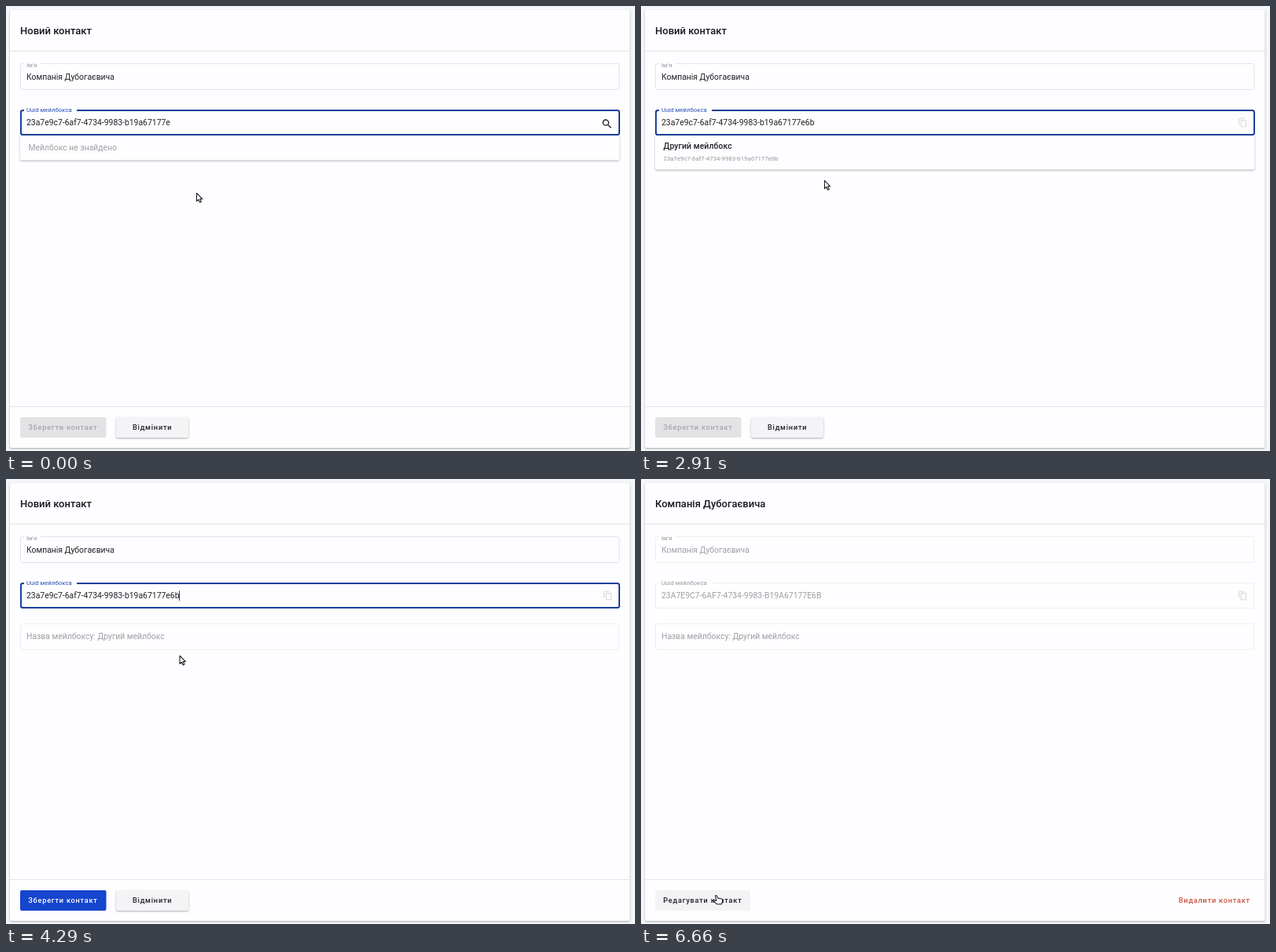
Write an HTML page that moves like this. It is 800x567 px and loops after 6810 ms.

```html
<!DOCTYPE html>
<html lang="uk">
<head>
<meta charset="utf-8">
<title>Новий контакт</title>
<style>
  html, body { margin: 0; width: 100%; height: 100%; overflow: hidden; background: #f4f6f9; }
  svg { display: block; width: 100%; height: 100%; }
  text { font: 400 10.4px Roboto, sans-serif; fill: #222126; }
  .title { font-size: 13px; font-weight: 500; fill: #18171c; }
  .label { font-size: 7.8px; fill: #98979c; }
  .button { font-size: 9.1px; font-weight: 500; letter-spacing: .0893em; }
  .muted { fill: #a09fa4; }
  .field { fill: none; stroke: #e3e2e6; }
  .pale { stroke: #efeef1; }
  .lift { filter: drop-shadow(0 1px 1.2px rgba(0, 0, 0, .32)); }
  .cursor { fill: #fff; stroke: #1b1b1f; stroke-width: 1.1; stroke-linejoin: round; }
</style>
</head>
<body>
<svg viewBox="0 0 800 567">
  <rect width="800" height="567" fill="#f4f6f9"/>
  <rect class="lift" x="5" y="5" width="788.5" height="558" rx="2.5" fill="#fefdff"/>
  <path d="M5 57.5H793.5M5 510.5H793.5" stroke="#e3e3e9"/>
  <text id="title" class="title" x="18" y="35.7"></text>

  <rect id="nameBox" class="field" x="18.5" y="73.5" width="761.5" height="33" rx="2.5"/>
  <rect x="23" y="71" width="21" height="5" fill="#fefdff"/>
  <text class="label" x="26" y="77.6">Ім'я</text>
  <text id="name" x="26" y="94"></text>

  <rect id="uuidBox" class="field" x="18.5" y="132.5" width="761.5" height="32" rx="2.5"/>
  <rect id="uuidFocus" x="19" y="133" width="761" height="31" rx="2.5" fill="none" stroke="#1c409c" stroke-width="2"/>
  <rect x="23" y="130" width="67" height="5" fill="#fefdff"/>
  <text id="uuidLabel" class="label" x="26" y="135.4">Uuid мейлбокса</text>
  <text id="uuid" x="26" y="152"></text>
  <rect id="caret" y="142.5" width="1" height="12.5" fill="#35343c"/>
  <path id="searchIcon" transform="translate(756.7 142.4) scale(.65)" fill="#1d1c21"
    d="M15.5 14h-.8l-.3-.3A6.5 6.5 0 1 0 13.7 14.4l.3.3v.8l5 5 1.5-1.5zM9.5 14a4.5 4.5 0 1 1 0-9 4.5 4.5 0 0 1 0 9z"/>
  <path id="copyIcon" transform="translate(759 142.3) scale(.52)" fill="none" stroke="#d6d5d9" stroke-width="2"
    d="M16 2H5Q3 2 3 4V17M9 6H19Q20 6 20 7V21Q20 22 19 22H9Q8 22 8 21V7Q8 6 9 6z"/>

  <g id="mailbox">
    <rect class="field pale" x="18.5" y="184.5" width="761.5" height="33" rx="2.5"/>
    <text class="muted" x="26" y="204">Назва мейлбоксу: Другий мейлбокс</text>
  </g>

  <g id="dropdown">
    <path id="panel" class="lift"/>
    <text id="empty" class="muted" x="28.5" y="184">Мейлбокс не знайдено</text>
    <g id="option">
      <text x="28.5" y="182" style="font-weight:500;letter-spacing:.1px">Другий мейлбокс</text>
      <text id="optionUuid" class="label" x="28.5" y="197.4"></text>
    </g>
  </g>

  <g id="editing">
    <rect id="save" x="18" y="524" width="109.5" height="26" rx="2"/>
    <circle id="ripple" cx="96" cy="533" fill="#fff" clip-path="inset(0)"/>
    <text id="saveText" class="button" x="28.3" y="540.3">Зберегти контакт</text>
    <rect class="lift" x="140" y="524" width="92" height="26" rx="2" fill="#f4f3f5"/>
    <text class="button" x="161" y="540.3">Відмінити</text>
  </g>
  <g id="viewing">
    <rect x="18" y="524" width="121" height="26" rx="2" fill="#f3f2f5"/>
    <text class="button" x="28.3" y="540.3">Редагувати контакт</text>
    <text class="button" x="683.8" y="540.3" style="fill:#c9523f">Видалити контакт</text>
  </g>

  <path id="arrow" class="cursor" d="M.5.5V10.8L2.9 8.6 4.5 12.3 6.3 11.5 4.7 7.9H7.8z"/>
  <path id="hand" class="cursor" d="M-1.4 1.5Q-1-.1.3.9L1.8 4.1 6 4.8Q7.6 5.2 7.5 7V9.2L6.4 11.7H.4L-3.4 8.2Q-3.8 6.8-2.3 6.9L-.2 7.6z"/>
</svg>
<script>
const LOOP = 6810, BLINK = 360;
const TYPE_6 = 2100, TYPE_B = 2370, FOUND = 2760, PICK = 3540, SAVE = 5910, SAVED = 6090;
const CONTACT = 'Компанія Дубогаєвича';
const UUID = '23a7e9c7-6af7-4734-9983-b19a67177e6b';
const PATH = [
  [0, 242, 238], [FOUND, 242, 238], [3210, 215, 190], [3360, 210, 184], [4110, 210, 184],
  [4350, 224, 238], [4620, 186, 400], [4920, 128, 496], [5400, 96, 530], [LOOP, 96, 530]
];

const el = {};
document.querySelectorAll('[id]').forEach(node => { el[node.id] = node; });
const show = (node, on) => { node.style.display = on ? '' : 'none'; };
const ramp = (t, from, to) => Math.min(1, Math.max(0, (t - from) / (to - from)));
const setText = (node, value) => { if (node.textContent !== value) node.textContent = value; };

function pointerAt(t) {
  const i = PATH.findIndex(point => point[0] > t);
  const [t0, x0, y0] = PATH[i - 1], [t1, x1, y1] = PATH[i];
  const k = ramp(t, t0, t1);
  return [x0 + (x1 - x0) * k, y0 + (y1 - y0) * k];
}

function caretVisible(t) {
  if (t >= SAVE) return false;
  // Each keystroke or refocus restarts the blink with the caret shown.
  const start = t >= PICK ? PICK : t >= TYPE_B ? TYPE_B : t >= TYPE_6 ? TYPE_6 : 150 - 2 * BLINK;
  return Math.floor((t - start) / BLINK) % 2 === 0;
}

function render(t) {
  const [x, y] = pointerAt(t);
  const found = t >= FOUND, picked = t >= PICK, saved = t >= SAVED;
  const hover = found && !picked && y < 208;
  const overSave = y >= 524 && x < 127;
  const typed = UUID.slice(0, t >= TYPE_B ? 36 : t >= TYPE_6 ? 35 : 34);

  setText(el.title, saved ? CONTACT : 'Новий контакт');
  setText(el.name, CONTACT);
  setText(el.uuid, saved ? UUID.toUpperCase() : typed);
  setText(el.optionUuid, UUID);
  el.name.setAttribute('class', saved ? 'muted' : '');
  el.uuid.setAttribute('class', saved ? 'muted' : '');
  el.nameBox.setAttribute('class', saved ? 'field pale' : 'field');
  el.uuidBox.setAttribute('class', saved ? 'field pale' : 'field');

  const focused = t < SAVE;
  el.uuidBox.style.stroke = focused ? '#4a69b5' : '';
  el.uuidLabel.style.fill = focused ? '#2450b4' : '';
  el.uuidFocus.style.opacity = !focused ? 0 : picked ? ramp(t, 3780, 3900) : 1;

  show(el.caret, caretVisible(t));
  el.caret.setAttribute('x', 26 + el.uuid.getComputedTextLength() - .5);
  show(el.searchIcon, t < TYPE_B);
  show(el.copyIcon, t >= TYPE_B);

  show(el.dropdown, t < PICK + 90);
  el.dropdown.style.opacity = 1 - ramp(t, PICK, PICK + 90);
  show(el.empty, !found);
  show(el.option, found);
  el.panel.setAttribute('d', `M18 165H780.5V${found ? 206 : 194}q0 2.5-2.5 2.5H20.5q-2.5 0-2.5-2.5z`);
  el.panel.setAttribute('fill', hover || picked ? '#ebeaed' : '#fefdff');
  show(el.mailbox, picked);

  show(el.editing, !saved);
  show(el.viewing, saved);
  el.save.setAttribute('fill', picked ? '#1645ce' : '#e3e2e4');
  el.saveText.style.fill = picked ? '#fff' : '#a7a6aa';
  const press = ramp(t, SAVE, SAVED);
  el.ripple.setAttribute('r', 12 * press);
  el.ripple.style.opacity = .15 * press;

  const hand = hover || overSave;
  show(el.hand, hand);
  show(el.arrow, !hand);
  (hand ? el.hand : el.arrow).setAttribute('transform', `translate(${x} ${y})`);
}

function tick() {
  render(performance.now() % LOOP);
  requestAnimationFrame(tick);
}
tick();
</script>
</body>
</html>
```
